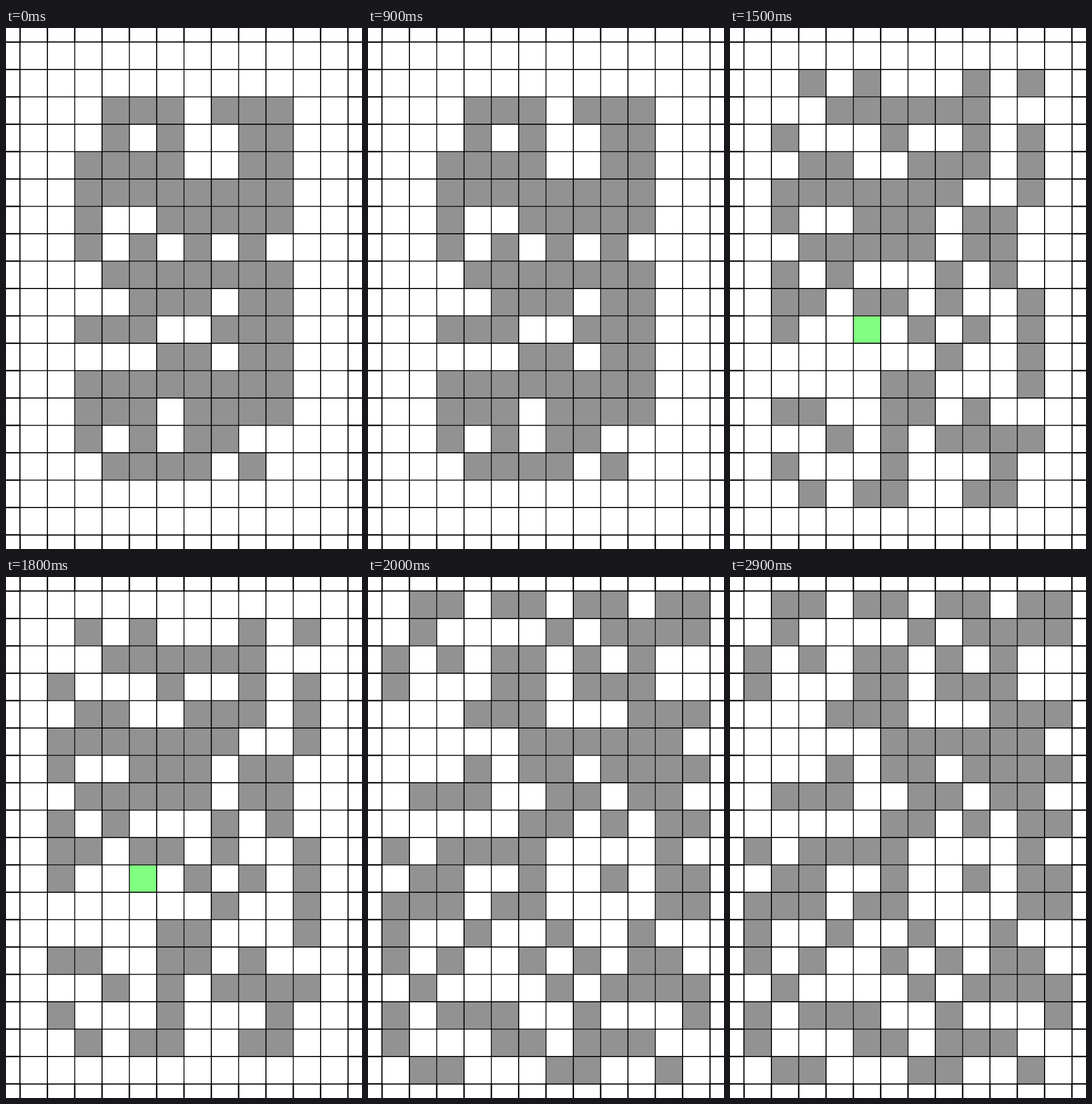
Animation of 619 by 904 pixels, one loop 3.5 s. Source, as an HTML page with a canvas:

```html
<!DOCTYPE html>
<html lang="en">
<head>
<meta charset="utf-8">
<title>Parity automaton</title>
<style>
  html, body { margin: 0; width: 100%; height: 100%; overflow: hidden; background: #fff; }
  canvas { display: block; }
</style>
</head>
<body>
<canvas id="stage" width="619" height="904"></canvas>
<script>
const ctx = document.getElementById('stage').getContext('2d');
const COLS = 12, ROWS = 18, PITCH = 47.5, ORIGIN = 24.5;
const OUTER_LINE = 2.4, INNER_LINE = 1.8;
const WHITE = '#fff', GREY = '#929292', GREEN = '#80ff80';
const FLIPPED = { row: 10, col: 4 };
const LOOP = 3500, STARTS = [0, 1500, 2000];

const blank = '.'.repeat(COLS);
const seed = [
  blank, blank,
  '...###.###..',
  '...#.#..##..',
  '..####..##..',
  '..########..',
  '..#..#####..',
  '..#.#.#.#...',
  '...#######..',
  '....###.##..',
  '..###..###..',
  '.....##.##..',
  '..########..',
  '..###.####..',
  '..#.#.##....',
  '...####.#...',
  blank, blank
].map(row => [...row].map(c => c === '#' ? 1 : 0));

// A cell lives on when its 3x3 block holds an odd number of live cells.
function step(grid) {
  return grid.map((cells, r) => cells.map((_, c) => {
    let sum = 0;
    for (let y = r - 1; y <= r + 1; y++)
      for (let x = c - 1; x <= c + 1; x++) sum += grid[y]?.[x] ?? 0;
    return sum % 2;
  }));
}

const second = step(seed);
second[FLIPPED.row][FLIPPED.col] ^= 1;
const generations = [seed, second, step(second)];

function draw(index) {
  const { width, height } = ctx.canvas;
  ctx.fillStyle = WHITE;
  ctx.fillRect(0, 0, width, height);

  ctx.fillStyle = '#000';
  const lineStart = i => ORIGIN + i * PITCH - OUTER_LINE / 2;
  for (let c = 0; c <= COLS; c++) ctx.fillRect(lineStart(c), 0, OUTER_LINE, height);
  for (let r = 0; r <= ROWS; r++) ctx.fillRect(0, lineStart(r), width, OUTER_LINE);

  const cellStart = i => ORIGIN + i * PITCH + INNER_LINE / 2;
  const size = PITCH - INNER_LINE;
  generations[index].forEach((cells, r) => cells.forEach((alive, c) => {
    const marked = index === 1 && r === FLIPPED.row && c === FLIPPED.col;
    ctx.fillStyle = marked ? GREEN : alive ? GREY : WHITE;
    ctx.fillRect(cellStart(c), cellStart(r), size, size);
  }));
}

let shown = -1;
function tick() {
  const t = performance.now() % LOOP;
  const index = STARTS.filter(start => start <= t).length - 1;
  if (index !== shown) draw(shown = index);
  requestAnimationFrame(tick);
}
tick();
</script>
</body>
</html>
```
